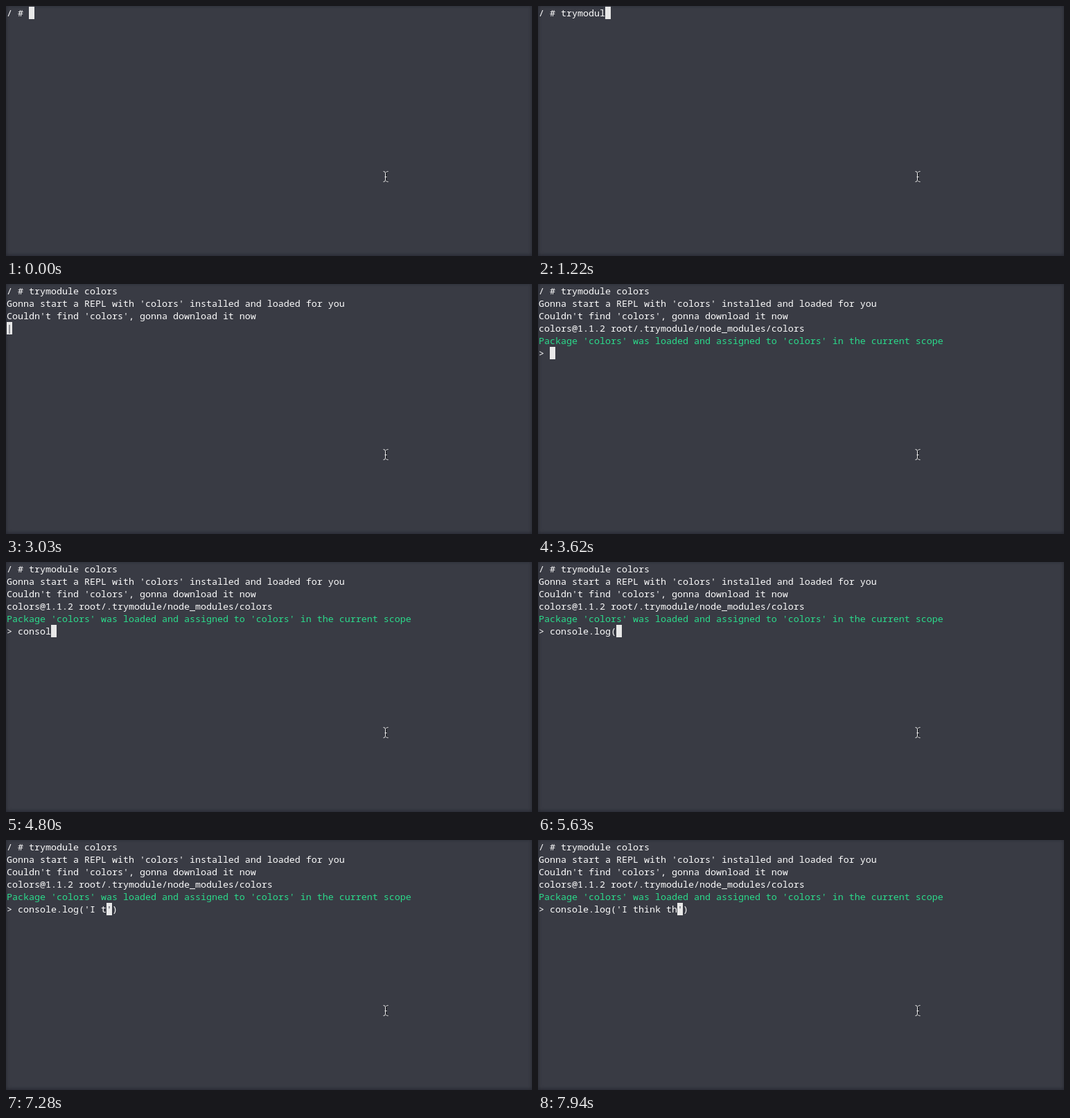
Write an HTML page with a canvas that moves like this. It is 759x362 px and loops after 7990 ms.

```html
<!DOCTYPE html>
<html lang="en">
<head>
<meta charset="utf-8">
<title>Terminal session</title>
<style>
  html, body { margin: 0; width: 759px; height: 362px; overflow: hidden; }
  canvas { display: block; background: #393b44; box-shadow: inset 0 -1px 5px #15172299; }
</style>
</head>
<body>
<canvas width="759" height="362"></canvas>
<script>
const ctx = document.querySelector('canvas').getContext('2d');
const LOOP = 7990, CELL = 8, ROW = 18;
const WHITE = '#fcfcfc', GREEN = '#2bdb8b', BLOCK = '#e8e8e8', DARK = '#393b44';
const FAMILY = '"Source Code Pro", "Noto Sans Mono", "DejaVu Sans Mono", monospace';

// Bursts of keys: first time, last time, keys ('<' moves the cursor left).
const shellKeys = [
  [350, 560, 'try'], [740, 980, 'modu'], [1220, 1340, 'le'],
  [1510, 1680, ' co'], [1860, 1860, 'l'], [2040, 2193, 'ors']
];
const replKeys = [
  [4270, 4620, 'conso'], [4800, 4800, 'l'], [4970, 4970, 'e.'], [5150, 5150, 'l'],
  [5330, 5450, 'og'], [5630, 5630, '('], [5800, 5800, ')'], [6160, 6160, '<'],
  [6330, 6330, "'"], [6510, 6510, "'"], [6690, 6690, '<'], [6930, 6930, 'I'],
  [7110, 7820, ' think t'], [7940, 7940, 'h']
];
const ENTER = 2270, LOOKUP = 2450, SPIN = 2860, SPIN_END = 3380, LOADED = 3620;

// Pick the font size whose advance is exactly one cell.
function fitFont() {
  ctx.font = '100px ' + FAMILY;
  ctx.font = 100 * CELL / ctx.measureText('0').width + 'px ' + FAMILY;
}

function type(prompt, bursts, t) {
  let text = prompt, pos = prompt.length;
  for (const [from, to, keys] of bursts) {
    [...keys].forEach((key, i) => {
      if (t < from + (to - from) * i / Math.max(1, keys.length - 1)) return;
      if (key === '<') return pos--;
      text = text.slice(0, pos) + key + text.slice(pos);
      pos++;
    });
  }
  return { text, pos };
}

function print(row, text, color = WHITE, col = 0) {
  ctx.fillStyle = color;
  ctx.fillText(text, 1 + col * CELL, 15 + row * ROW);
}

function cursor(row, col, char = '') {
  ctx.fillStyle = BLOCK;
  ctx.fillRect(1 + col * CELL, 1 + row * ROW, CELL, ROW);
  print(row, char, DARK, col);
}

function prompt(row, { text, pos }, active) {
  print(row, text);
  if (active) cursor(row, pos, text[pos]);
}

function strokePath(path, color, width) {
  ctx.strokeStyle = color;
  ctx.lineWidth = width;
  ctx.stroke(new Path2D(path));
}

function pointer() {
  strokePath('M548.5 241V253M550 240.5H551M550 253.5H551', '#15171c', 1.4);
  strokePath('M544.5 239.5Q547.5 239.5 547.5 242V252Q547.5 254.5 544.5 254.5' +
    'M551.5 239.5Q549 239.5 548.5 241M551.5 254.5Q549 254.5 548.5 253M546.5 247.5H549.5', '#f0f0f0', 1);
}

function draw(t) {
  ctx.clearRect(0, 0, 759, 362);
  prompt(0, type('/ # ', shellKeys, t), t < ENTER);
  if (t >= ENTER && t < LOOKUP) cursor(1, 0);
  if (t >= LOOKUP) {
    print(1, "Gonna start a REPL with 'colors' installed and loaded for you");
    print(2, "Couldn't find 'colors', gonna download it now");
  }
  if (t >= LOOKUP && t < LOADED) {
    const step = Math.min(9, Math.floor((t - SPIN) * 9 / (SPIN_END - SPIN)));
    cursor(3, 0, step < 0 ? '' : '-\\|/'[step % 4]);
  }
  if (t >= LOADED) {
    print(3, 'colors@1.1.2 root/.trymodule/node_modules/colors');
    print(4, "Package 'colors' was loaded and assigned to 'colors' in the current scope", GREEN);
    prompt(5, type('> ', replKeys, t), true);
  }
  pointer();
}

fitFont();
const start = performance.now();
function tick() {
  draw((performance.now() - start) % LOOP);
  requestAnimationFrame(tick);
}
tick();
</script>
</body>
</html>
```
